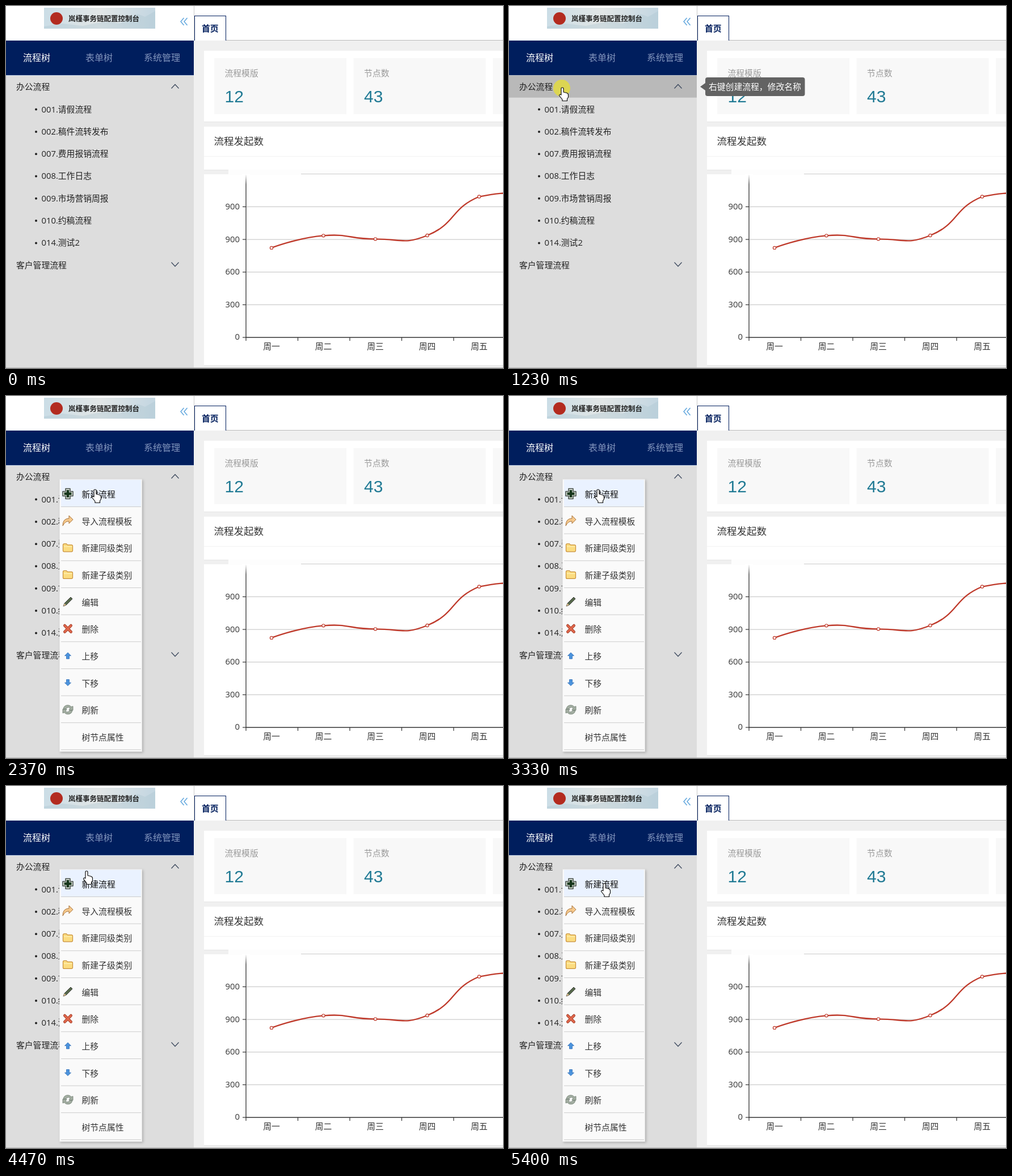
An HTML page that plays this animation: 876x639 px, repeating every 6480 ms.

```html
<!DOCTYPE html>
<html lang="zh-CN">
<head>
<meta charset="utf-8">
<title>流程设计器</title>
<style>
html, body { margin: 0; width: 100%; height: 100%; overflow: hidden; background: #fff; }
svg { display: block; font-family: "Open Sans", "Noto Sans CJK SC", "Noto Sans CJK", sans-serif; }
</style>
</head>
<body>
<svg id="stage" width="876" height="639" viewBox="0 0 876 639">
  <defs>
    <linearGradient id="sky">
      <stop offset="0" stop-color="#cbdde6"/><stop offset=".5" stop-color="#e2e6e6"/><stop offset="1" stop-color="#c3d6e1"/>
    </linearGradient>
    <linearGradient id="fade" x2="0" y2="1">
      <stop offset="0" stop-color="#fff"/><stop offset="1" stop-color="#fff" stop-opacity="0"/>
    </linearGradient>
    <filter id="shadow" x="-10%" y="-10%" width="120%" height="120%">
      <feDropShadow dx="2" dy="2" stdDeviation="2" flood-opacity=".2"/>
    </filter>
  </defs>
  <g id="page"></g>
  <rect id="hover" width="331" height="39.3" fill="#b9b9b9"/>
  <g id="tree"></g>
  <g id="tip"></g>
  <g id="menu"></g>
  <circle id="click" r="15" fill="#dcd552"/>
  <path id="hand" fill="#fff" stroke="#111" stroke-width="1.2" stroke-linejoin="round"
    d="M-2 2Q-2 0 0 0T2 2V8L8 9.5Q10.5 10.5 10.5 13V17L8.5 20V23.5H0V21L-5.5 14Q-5 11 -2 13Z"/>
</svg>
<script>
const $ = id => document.getElementById(id);
const rect = (x, y, w, h, fill, extra = '') =>
  `<rect x="${x}" y="${y}" width="${w}" height="${h}" fill="${fill}" ${extra}/>`;
const path = (d, stroke, width = 1, fill = 'none', extra = '') =>
  `<path d="${d}" stroke="${stroke}" stroke-width="${width}" fill="${fill}" ${extra}/>`;
// cy is the vertical middle of the glyphs
const text = (x, cy, str, fill = '#222', size = 14.8, extra = '') =>
  `<text x="${x}" y="${cy + size * .37}" font-size="${size}" fill="${fill}" ${extra}>${str}</text>`;

function chart() {
  const xOf = i => 468 + i * 91.5;
  const pts = [820, 932, 901, 934, 1290, 1330, 1320].map((v, i) => [xOf(i), 584.5 - v * .1922]);
  const ys = pts.map(p => p[1]);
  const top = Math.min(...ys), bottom = Math.max(...ys);
  const dist = (a, b) => Math.hypot(a[0] - b[0], a[1] - b[1]);
  // smoothing handles along the chord of the two neighbours, kept within the data range
  const handle = (i, side) => {
    const p = pts[i], a = pts[i - 1], b = pts[i + 1];
    if (!a || !b) return p;
    const k = side * .5 * dist(p, side < 0 ? a : b) / (dist(p, a) + dist(p, b));
    const y = p[1] + (b[1] - a[1]) * k;
    return [p[0] + (b[0] - a[0]) * k, Math.max(top, Math.min(bottom, y))];
  };
  let out = path('M520 296.5H876', '#ccc');
  ['0', '300', '600', '900', '900'].forEach((label, i) => {
    const y = 585 - i * 57.65;
    if (i) out += path(`M424 ${y}H876`, '#ccc', 1.2);
    out += path(`M417 ${y}H423`, '#333', 1.2) + text(412, y - 1, label, '#333', 14.8, 'text-anchor="end"');
  });
  out += path('M423 298V585H876', '#333', 1.3) + rect(416, 297, 14, 18, 'url(#fade)');
  ['一', '二', '三', '四', '五'].forEach((day, i) => {
    out += path(`M${423 + i * 91.5} 585v6`, '#333', 1.2) + text(xOf(i), 601, '周' + day, '#333', 14.8, 'text-anchor="middle"');
  });
  let d = 'M' + pts[0];
  for (let i = 1; i < pts.length; i++) d += `C${handle(i - 1, 1)} ${handle(i, -1)} ${pts[i]}`;
  out += path(d, '#bf3a2b', 2.3);
  for (const [x, y] of pts) out += `<circle cx="${x}" cy="${y}" r="2.6" fill="#fff" stroke="#bf3a2b" stroke-width="1.2"/>`;
  return out;
}

function page() {
  let out = rect(0, 0, 331, 61, '#fff') + rect(331, 0, 1, 61, '#ccc')
    + rect(67, 3, 196, 37, 'url(#sky)')
    + path('M67 36L100 31L135 35L175 27L200 31L232 14L245 19L263 9V40H67Z', 'none', 0, '#a9c2cf', 'opacity=".35"')
    + '<circle cx="89" cy="22" r="11" fill="#b32b20"/>'
    + text(110, 22.5, '岚槿事务链配置控制台', '#222', 12.5, 'font-weight="700"')
    + path('M313.5 21L308 27.5L313.5 34M319.5 21L314 27.5L319.5 34', '#5ba3dc', 1.4)
    + rect(0, 61, 331, 61, '#001e5d')
    + text(30, 91.5, '流程树', '#fff', 16, 'font-weight="500"')
    + text(140, 91.5, '表单树', '#8295bd', 16) + text(243, 91.5, '系统管理', '#8295bd', 16)
    + rect(0, 122, 331, 517, '#ddd') + rect(0, 122, 331, 1, '#b4c8e2')
    + rect(331, 61, 545, 578, '#f0f0f0') + rect(332, 60, 544, 1, '#bbb')
    + rect(332.5, 17.5, 55, 43, '#fff', 'stroke="#001e5d"') + rect(333, 60, 54, 1, '#fff')
    + text(345, 40, '首页', '#001e5d', 14.8, 'font-weight="700"');
  for (const [y, h] of [[79, 125], [213, 76], [297, 337]])
    out += rect(349, y + 1, 527, h, '#e5e5e5') + rect(349, y, 527, h, '#fff');
  out += rect(349, 265, 527, 1, '#f3f3f3') + rect(392, 289, 484, 9, '#fdfdfd');
  [['流程模版', 12], ['节点数', 43], ['', '']].forEach(([name, count], i) => {
    const x = 367 + i * 245.6;
    out += rect(x, 92, 233, 99, '#f8f8f8') + text(x + 18.5, 118.5, name, '#999')
      + `<text x="${x + 18.5}" y="170" font-size="30" fill="#207a94" font-family="Liberation Sans, Arial, sans-serif">${count}</text>`;
  });
  return out + text(366.5, 238.5, '流程发起数', '#333', 17.5) + chart() + rect(0, 638, 876, 1, '#bbb');
}

const ROW_TOP = 122.4, ROW = 39.3;
function tree() {
  const rows = ['办公流程', '001.请假流程', '002.稿件流转发布', '007.费用报销流程', '008.工作日志',
    '009.市场营销周报', '010.约稿流程', '014.测试2', '客户管理流程'];
  return rows.map((name, i) => {
    const y = 142.8 + i * ROW, leaf = i > 0 && i < 8;
    return text(leaf ? 62.5 : 18, y, name)
      + (leaf ? `<circle cx="53" cy="${y + .5}" r="2" fill="#222"/>` : '');
  }).join('') + path('M291.5 145.5L298 138.5L304.5 145.5M291.5 452.5L298 459.5L304.5 452.5', '#3a475c', 1.2);
}

function menu() {
  const folder = path('M-8.5-5q0-2 2-2h4l2 2h7q2 0 2 2v8q0 2-2 2h-13q-2 0-2-2z', '#c9903a', 1.2, '#fbdc80')
    + path('M-7-2H7.5', '#fff0b8', 1.2);
  const up = path('M0-5.5L5.5 0H2.5V5.5H-2.5V0H-5.5Z', '#2f6db5', .8, '#4b93dd');
  const icons = [
    path('M-4-9H4V-4H9V4H4V9H-4V4H-9V-4H-4Z', '#444c46', 1.5, '#dfe6df', 'stroke-linejoin="round"')
      + path('M0-6.5V6.5M-6.5 0H6.5', '#16361c', 4.5),
    path('M-9 9Q-9-4 2-4V-9L9-2L2 5V1Q-4 0-9 9Z', '#a8733a', 1, '#f6c98c'),
    folder, folder,
    path('M-8 8L-6 3L5-8L8-5L-3 6Z', '#333', 1, '#586b4c') + path('M-8 8L-6 3L-3 6Z', 'none', 0, '#d9bd8e'),
    path('M-5.5-5.5L5.5 5.5M5.5-5.5L-5.5 5.5', '#a9442f', 5, 'none', 'stroke-linecap="round"')
      + path('M-5.5-5.5L5.5 5.5M5.5-5.5L-5.5 5.5', '#e2684c', 3, 'none', 'stroke-linecap="round"'),
    up, `<g transform="scale(1 -1)">${up}</g>`,
    path('M-8-1Q-7-8 0-8Q4-8 6-5L9-6V1H2L4-3Q0-6-4-1ZM8 1Q7 8 0 8Q-4 8-6 5L-9 6V-1H-2L-4 3Q0 6 4 1Z', '#6f7d70', .8, '#a3aea2'),
    ''];
  const names = ['新建流程', '导入流程模板', '新建同级类别', '新建子级类别', '编辑', '删除', '上移', '下移', '刷新', '树节点属性'];
  return rect(94.5, 147, 145, 480.5, '#fafafa', 'stroke="#e6e6e6" filter="url(#shadow)"')
    + rect(97, 148, 141, 47, '#eaf2ff', 'id="firstRow"')
    + names.map((name, i) => {
      const y = 173 + i * 47.65;
      return `<g transform="translate(109 ${y - .5})">${icons[i]}</g>`
        + text(133.5, y + .5, name, i ? '#333' : '#111') + path(`M97 ${y + 22.5}H238`, '#ccc');
    }).join('');
}

$('page').innerHTML = page();
$('tree').innerHTML = tree();
$('menu').innerHTML = menu();
$('tip').innerHTML = path('M337 142.5L346 136V149Z', 'none', 0, '#636363')
  + rect(346, 126, 175.5, 33, '#636363', 'rx="4"') + text(352, 143, '右键创建流程，修改名称', '#fff');

// cursor keys: time, x, y
const keys = [[600, 94, 144], [1860, 94, 144], [2370, 157, 165], [3330, 157, 165], [3540, 165, 171],
  [3750, 159, 178], [3960, 150, 176], [4200, 143, 165], [4470, 142, 150], [4620, 150, 149],
  [4900, 164, 157], [5280, 167, 171], [5400, 168, 172], [6480, 168, 172]];

function cursorAt(t) {
  if (t < 600) {
    const left = (1 - (t - 120) / 480) ** 3;
    return [94 + 144 * left, 144 + 536 * left];
  }
  const i = keys.findIndex(k => k[0] > t);
  const [a, b] = [keys[i - 1], keys[i]];
  let p = (t - a[0]) / (b[0] - a[0]);
  if (a[0] === 1860) p = p * p * (3 - 2 * p);
  return [a[1] + (b[1] - a[1]) * p, a[2] + (b[2] - a[2]) * p];
}

const show = (id, on) => $(id).setAttribute('visibility', on ? 'visible' : 'hidden');

function draw(now) {
  const t = Math.floor(now % 6480 / 30) * 30;
  const [x, y] = cursorAt(t);
  const row = Math.floor((y - ROW_TOP) / ROW);
  const menuOpen = t >= 1350;
  show('hand', t >= 120);
  show('hover', t >= 120 && !menuOpen && row < 9);
  show('tip', t >= 750 && !menuOpen);
  show('menu', menuOpen);
  $('firstRow').setAttribute('opacity', t >= 1890 ? 1 : 0);
  show('click', t >= 1230 && t < 1440);
  $('hover').setAttribute('y', ROW_TOP + row * ROW);
  $('hand').setAttribute('transform', `translate(${x} ${y})`);
  $('click').setAttribute('cx', x - 1);
  $('click').setAttribute('cy', y + 1);
  requestAnimationFrame(() => draw(performance.now() - start));
}
const start = performance.now();
draw(0);
</script>
</body>
</html>
```
